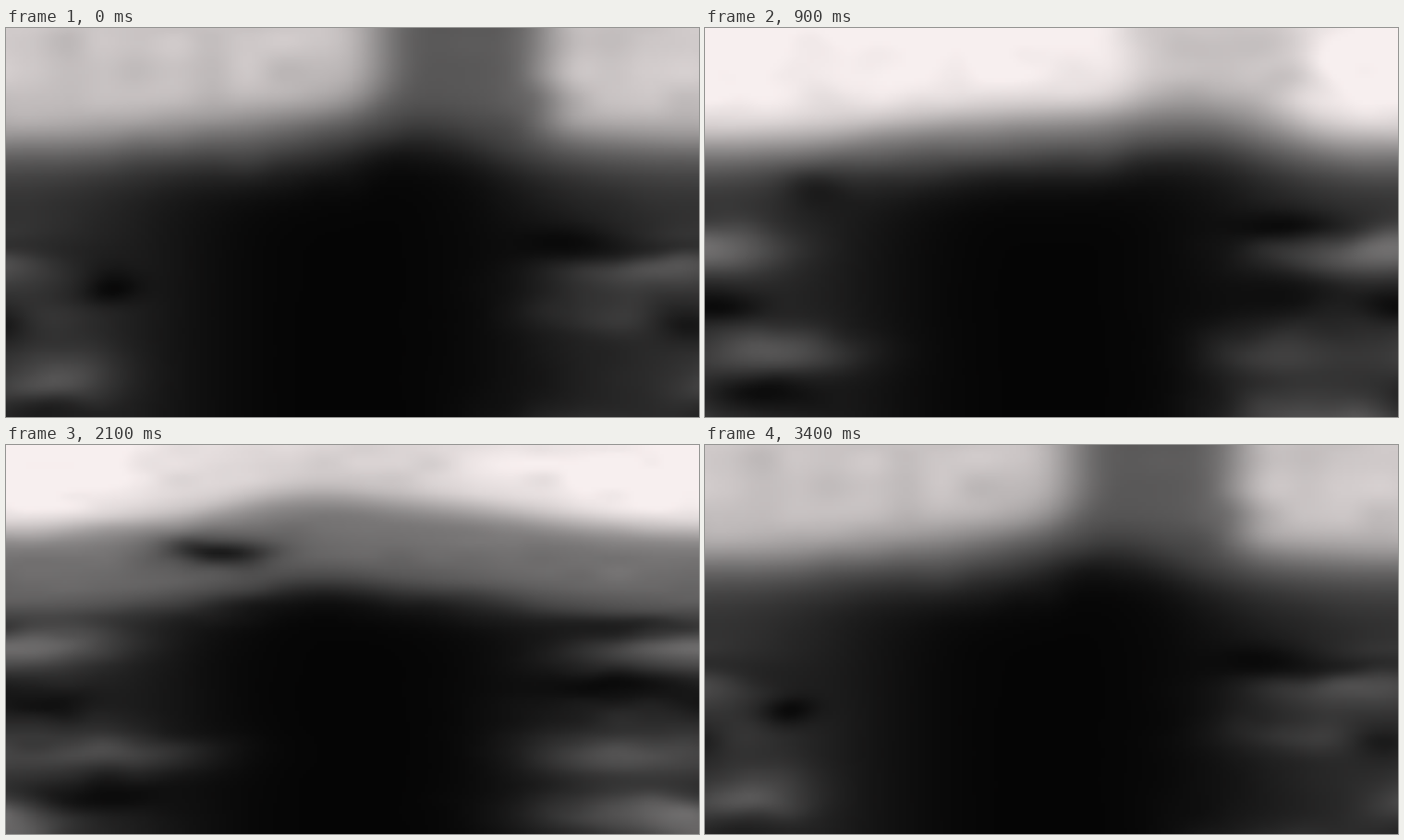
Animation, 750 px wide and 422 px high, one loop 3500 ms. Source, as an HTML page with a canvas:

```html
<!DOCTYPE html>
<html lang="en">
<head>
<meta charset="utf-8">
<title>Drifting smoke</title>
<style>
  html, body { margin: 0; width: 100%; height: 100%; overflow: hidden; background: #050505; }
  canvas { display: block; width: 750px; height: 422px; }
</style>
</head>
<body>
<canvas id="sky" width="188" height="106"></canvas>
<script>
const W = 750, H = 422, LOOP = 3500, STEP = 100;
const sky = document.getElementById('sky');
const ctx = sky.getContext('2d');
const image = ctx.createImageData(sky.width, sky.height);

const mod = (a, n) => ((a % n) + n) % n;
const mix = (a, b, k) => a + (b - a) * k;
const smooth = k => k * k * (3 - 2 * k);
const ramp = (t, from, to) => smooth(Math.min(1, Math.max(0, (t - from) / (to - from))));
const below = (y, edge, soft) => 1 / (1 + Math.exp((y - edge) / soft));
// Signed distances on the repeating stage and in the repeating loop.
const wrapX = dx => mod(dx + W / 2, W) - W / 2;
const wrapT = dt => mod(dt + LOOP / 2, LOOP) - LOOP / 2;

// Seeded value noise, repeating over the stage width.
let seed = 7;
const lattice = Array.from({ length: 1024 }, () => {
  seed = (seed * 16807) % 2147483647;
  return seed / 2147483647 - .5;
});
function noise(x, y, cols) {
  const u = mod(x / W * cols, cols), v = y / W * cols + 40;
  const i = Math.floor(u), j = Math.floor(v), a = smooth(u - i), b = smooth(v - j);
  const at = (c, r) => lattice[(c % cols + r * 37) & 1023];
  return mix(mix(at(i, j), at(i + 1, j), a), mix(at(i, j + 1), at(i + 1, j + 1), a), b);
}

// Soft puffs all drift up and to the right, stretching as they age.
const puff = (x, y, rx, peak, speed = 1) => ({ x, y, rx, peak, speed });
const glows = [
  puff(95, 347, 90, 1300),
  puff(20, 236, 75, 1000),
  puff(700, 238, 90, 1300),
  puff(655, 412, 90, 1500),
  puff(650, 336, 90, 2100),
  puff(5, 413, 50, 2200)
];
const shades = [
  puff(107, 275, 32, 0, 6),
  puff(760, 298, 55, 1000),
  puff(625, 222, 75, 700),
  puff(660, 265, 100, 2100),
  puff(85, 392, 75, 1400),
  puff(200, 135, 52, 1750, 3)
];

function active(puffs, t, strength, ry) {
  return puffs.map(p => {
    const dt = wrapT(t - p.peak), age = dt / (LOOP / 2) * Math.sqrt(p.speed);
    return {
      strength: strength * Math.sqrt(Math.max(0, 1 - age * age)),
      x: p.x + 3 * p.speed * dt / 100,
      y: p.y - 1.7 * p.speed * dt / 100,
      rx: p.rx * (1 + .35 * age),
      ry: ry * (1 - .25 * age)
    };
  }).filter(p => p.strength > 0);
}

function weight(p, x, y) {
  const q = (wrapX(x - p.x) / p.rx) ** 2 + ((y - p.y) / p.ry) ** 2;
  return q < 6 ? p.strength * Math.exp(-q) : 0;
}

// A bright cap over a grey shelf, with a gap in the cap that closes and reopens.
function cloud(t) {
  const s = wrapT(t), late = ramp(t, 1000, 2100) * (1 - ramp(t, 2500, 3400));
  const gain = .8 + .2 * ramp(t, 0, 700) - .2 * ramp(t, 2100, 2600);
  const gap = 1 - ramp(Math.abs(s), 0, 1500);
  const lift = 32 * (1 - ramp(Math.abs(s), 0, 2200));
  return (x, y) => {
    const side = Math.cos(2 * Math.PI * x / W);
    const rise = lift * Math.exp(-((wrapX(x - 455 - .09 * s) / 85) ** 2));
    const open = gap * Math.exp(-((wrapX(x - 495 - .07 * s) / 100) ** 4));
    const cap = (135 + late * (20 * side - 12)) * (1 - open);
    const capEdge = 110 - 30 * late + 14 * side - rise;
    const shelfEdge = 151 + 20 * late + (4 + 8 * late) * side - rise;
    const haze = 42 * ((1 + side) / 2) ** 1.5;
    return gain * (cap * below(y, capEdge, 14 - 4 * late) + 105 * below(y, shelfEdge, 16 - 4 * late))
      + haze * (1 - below(y, shelfEdge, 16));
  };
}

function draw(t) {
  const bank = cloud(t);
  const lights = active(glows, t, 45, 24), darks = active(shades, t, .85, 20);
  const squash = 1.7 - .6 * Math.cos(2 * Math.PI * (t - 300) / LOOP);
  const layers = [0, .5].map(o => {
    const phase = mod(t / LOOP + o, 1);
    return { shift: phase * 180 + o * 500, amount: 1 - Math.abs(2 * phase - 1) };
  });
  let n = 0;
  for (let j = 0; j < sky.height; j++) {
    for (let i = 0; i < sky.width; i++) {
      const px = (i + .5) * W / sky.width, py = (j + .5) * H / sky.height;
      let wide = 0, fine = 0;
      for (const { shift, amount } of layers) {
        const u = px - shift, v = py * squash + shift * .3;
        wide += amount * noise(u, v, 9);
        fine += amount * noise(u, v, 19);
      }
      const x = px + 16 * wide + 8 * fine, y = py + 12 * wide + 8 * fine;
      let v = bank(x, y);
      for (const p of lights) v += weight(p, x, y);
      for (const p of darks) v *= 1 - weight(p, x, y);
      v = Math.min(247, 5 + v * (1 + .14 * wide + .12 * fine));
      const cool = v - 9 * (v / 255) ** 2;
      image.data.set([v, cool, cool, 255], n);
      n += 4;
    }
  }
  ctx.putImageData(image, 0, 0);
}

let shown = -1;
function tick(now) {
  const step = Math.floor(mod(now, LOOP) / STEP);
  if (step !== shown) draw((shown = step) * STEP);
  requestAnimationFrame(tick);
}
tick(0);
</script>
</body>
</html>
```
